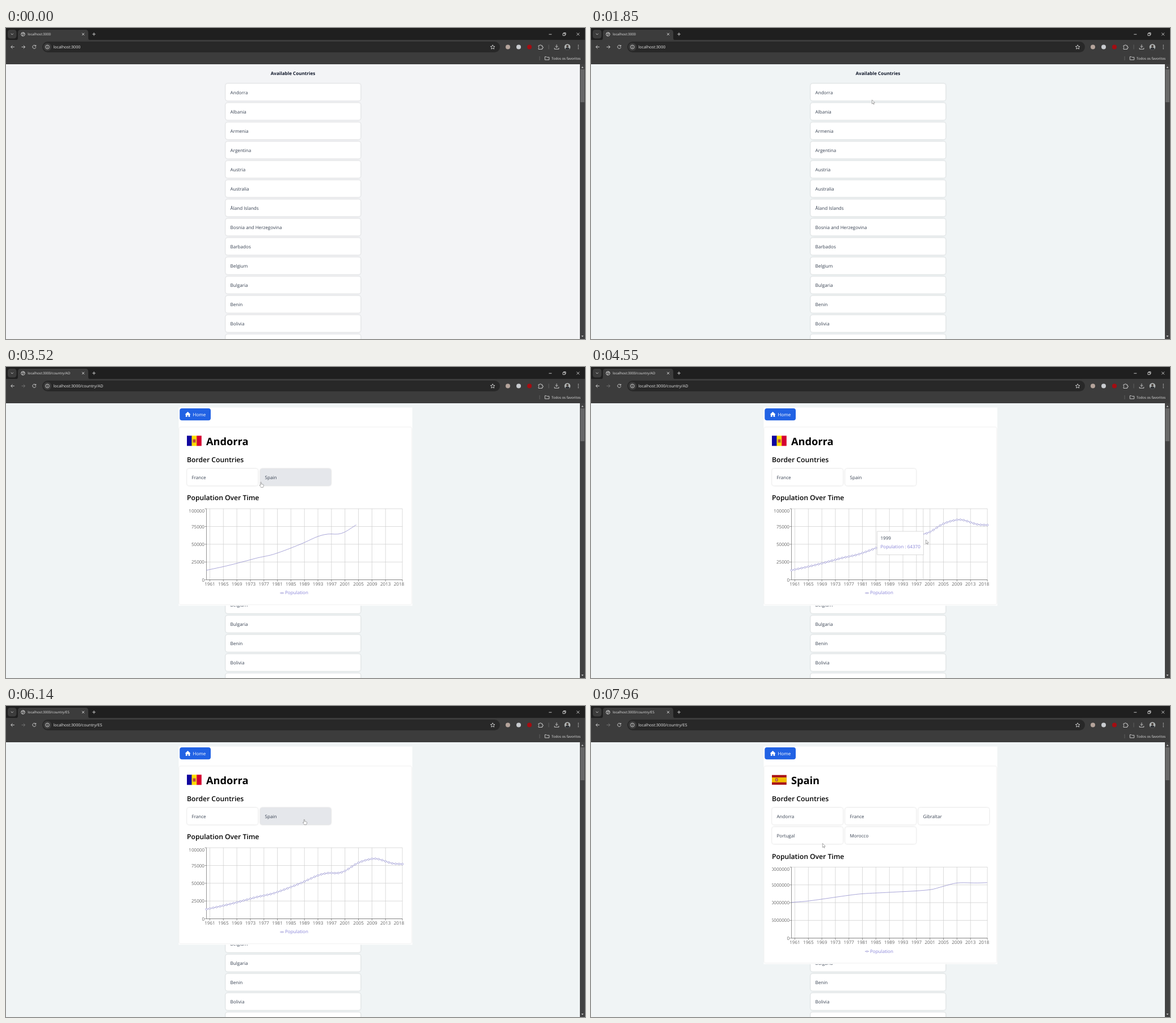
Animation, 1021 px wide and 549 px high, one loop 8 s. Source, as an HTML page:

```html
<!DOCTYPE html>
<html lang="en">
<head>
<meta charset="utf-8">
<title>Countries</title>
<style>
html, body { margin: 0; width: 100%; height: 100%; overflow: hidden; }
svg { display: block; width: 1021px; height: 549px; }
text { font-family: 'Open Sans', 'Noto Sans', sans-serif; font-size: 8.08px; fill: #374151; text-rendering: geometricPrecision; white-space: pre; }
.item { fill: #fff; filter: drop-shadow(0 .6px .8px #0003); }
.item.hover { fill: #e5e7eb; }
.head { font-weight: 700; fill: #0f172a; }
.name { font-size: 18.2px; font-weight: 700; fill: #000; }
.sub { font-size: 12.15px; font-weight: 600; fill: #000; }
.tick { fill: #666; }
.pop { fill: #8884d8; }
.small { font-size: 6.05px; fill: #e3e3e3; }
.url { font-size: 7.08px; fill: #e8e8e8; }
.icon { fill: none; stroke: #d6d6d6; stroke-width: .9; }
.grid { fill: none; stroke: #ccc; stroke-width: .7; }
.axis { fill: none; stroke: #666; stroke-width: .7; }
.line { fill: none; stroke: #8480c8; stroke-width: .7; }
.dot { fill: #fff; stroke: #8480c8; stroke-width: .6; }
</style>
</head>
<body>
<svg id="stage" viewBox="0 0 1021 549"></svg>
<script>
const LOOP = 8000;
const URL_AD = 2400, OPEN_AD = 2790, URL_ES = 6140, OPEN_ES = 6470;
const DRAW_TIME = 1500, DOTS_AT = OPEN_AD + 30 + DRAW_TIME;
const YEARS = 58, PLOT_X = 353.5, PLOT_END = 699, PLOT_H = 125.4, PLOT_TOP = 250.2;
const ROW = 34.2;

const countries = ['Andorra', 'Albania', 'Armenia', 'Argentina', 'Austria', 'Australia', 'Åland Islands',
  'Bosnia and Herzegovina', 'Barbados', 'Belgium', 'Bulgaria', 'Benin', 'Bolivia', ''];

// Key points of population: [years since 1960, thousands or millions]
const andorra = curve([[0, 13.4], [6, 19.6], [12, 26.9], [15, 30.7], [20, 36.1], [28, 50.4], [33, 61],
  [36, 64.36], [39, 64.37], [41, 67.3], [45, 78.9], [49, 84.4], [51, 83.9], [55, 78], [58, 77]]);
const spain = curve([[0, 30.2], [5, 31.4], [17, 36.2], [21, 37.5], [29, 38.7], [41, 40.9], [45, 43.8],
  [49, 46.6], [55, 46.6], [58, 46.9]]);

// Stops of the pointer and of the chart tooltip: [time, x, y]
const pointerStops = [[170, 1003, 400], [660, 624.6, 491], [880, 598, 514], [1370, 598, 514], [1440, 585, 526],
  [1850, 495.5, 126.8], [1910, 495.5, 126.8], [1920, 474, 117], [2260, 474, 117], [3120, 436, 160],
  [3520, 449.5, 203], [4200, 515, 206], [4550, 590.5, 305], [4790, 594, 315], [5400, 594, 300],
  [5740, 596, 219], [5970, 526, 200], [6460, 526, 200], [7350, 440, 172], [7700, 396, 210], [7960, 408.3, 242.5]];
const tooltipStops = [[4550, 504.5, 290], [4950, 597, 318], [5640, 597, 290]];

function along(stops, t) {
  const i = stops.findIndex(s => s[0] > t);
  if (i < 0) return stops.at(-1).slice(1);
  if (i === 0) return stops[0].slice(1);
  const [t0, x0, y0] = stops[i - 1], [t1, x1, y1] = stops[i], u = (t - t0) / (t1 - t0);
  return [x0 + (x1 - x0) * u, y0 + (y1 - y0) * u];
}

// Smooth function through key points (cubic Hermite)
function curve(pts) {
  const slope = i => {
    const a = pts[Math.max(0, i - 1)], b = pts[Math.min(pts.length - 1, i + 1)];
    return (b[1] - a[1]) / (b[0] - a[0]);
  };
  return x => {
    const i = Math.max(1, pts.findIndex(p => p[0] >= x)), [x0, y0] = pts[i - 1], [x1, y1] = pts[i];
    const w = x1 - x0, u = (x - x0) / w, v = 1 - u;
    return y0 * v * v * (1 + 2 * u) + y1 * u * u * (1 + 2 * v) + w * u * v * (slope(i - 1) * v - slope(i) * u);
  };
}

// cubic-bezier(.25, .1, .25, 1)
function ease(x) {
  if (x <= 0) return 0;
  if (x >= 1) return 1;
  let lo = 0, hi = 1, s;
  for (let i = 0; i < 20; i++) {
    s = (lo + hi) / 2;
    if (.75 * s * (1 - s) + s ** 3 < x) lo = s; else hi = s;
  }
  return .3 * s * (1 - s) ** 2 + 3 * s * s * (1 - s) + s ** 3;
}

const text = (x, y, s, cls = '', more = '') => `<text x="${x}" y="${y}" class="${cls}" ${more}>${s}</text>`;
const rect = (x, y, w, h, fill, rx = 0, more = '') =>
  `<rect x="${x}" y="${y}" width="${w}" height="${h}" rx="${rx}" fill="${fill}" ${more}/>`;
const circle = (x, y, r, fill, more = '') => `<circle cx="${x}" cy="${y}" r="${r}" fill="${fill}" ${more}/>`;
const path = (cls, d, more = '') => `<path class="${cls}" d="${d}" ${more}/>`;
const icon = (d, more) => path('icon', d, more);
const item = (x, y, w, label, layer) =>
  rect(x, y, w, 30, '#fff', 4, `class="item" data-layer="${layer}"`) + text(x + 8.3, y + 18.3, label);

const yearX = n => PLOT_X + n * (PLOT_END - PLOT_X) / YEARS;
const plot = (value, max, top) => Array.from({ length: YEARS + 1 },
  (_, n) => [yearX(n), top + PLOT_H * (1 - value(n) / max)]);

function chart(top, pts, max, id) {
  const bottom = top + PLOT_H, legendY = top + 148.8;
  let s = '';
  for (let i = 0; i <= 4; i++) {
    const y = bottom - i * PLOT_H / 4;
    s += path('grid', `M${PLOT_X} ${y}H${PLOT_END}`) + path('axis', `M350.5 ${y}h3`)
      + text(350, y + (i === 4 ? 6.8 : 3), max / 4 * i, 'tick', 'text-anchor="end" clip-path="url(#chartClip)"');
  }
  for (let i = 0; i <= 14; i++) {
    const n = Math.min(1 + i * 4, YEARS), x = yearX(n);
    if (i < 14) s += path('grid', `M${x} ${top}V${bottom}`);
    if (i === 13) continue;
  }
  const labelled = [...Array.from({ length: 14 }, (_, i) => 1 + i * 4), YEARS];
  s += path('grid', `M${PLOT_END} ${top}V${bottom}`);
  for (const n of labelled.filter(n => n < 57 || n === YEARS))
    s += path('axis', `M${yearX(n)} ${bottom}v3`)
      + text(Math.min(yearX(n), 693), bottom + 10.2, 1960 + n, 'tick', 'text-anchor="middle"');
  return s + path('axis', `M${PLOT_X} ${top}V${bottom}H${PLOT_END}`)
    + path('line', 'M' + pts.join('L'), `id="line${id}" pathLength="1"`)
    + path('line', `M483 ${legendY}h7.4`) + circle(486.7, legendY, 1.3, '#fff', 'class="dot"')
    + text(492, legendY + 2.4, 'Population', 'pop');
}

function card(id, name, flag, borders, pts, max) {
  const shift = borders.length > 3 ? ROW : 0;
  return `<g id="card${id}">${rect(304.5, 71.5, 412, 350 + shift, '#fff')}
    ${rect(305.5, 106.5, 409.5, 312.5 + shift, '#fff', 3, 'style="filter:drop-shadow(0 .6px .8px #0002)"')}
    ${rect(306.3, 73, 54.7, 21.3, '#2162e4', 4)}
    <path d="M315.6 83.8l5-4.8 5 4.8h-1.3v4.2h-2.7v-3h-2v3h-2.7v-4.2z" fill="#fff"/>${text(329.5, 86.8, 'Home', '', 'style="fill:#fff"')}
    ${flag}${text(353, 138, name, 'name')}${text(319, 167.5, 'Border Countries', 'sub')}
    ${borders.map((b, i) => item(319.2 + i % 3 * 129, 179.4 + (i / 3 | 0) * ROW, 125, b, id)).join('')}
    ${text(319, 235.4 + shift, 'Population Over Time', 'sub')}
    ${chart(PLOT_TOP + shift, pts, max, id)}</g>`;
}

const flagAD = rect(319, 121.3, 9, 18, '#10069f') + rect(327.5, 121.3, 9, 18, '#fedd00') + rect(336.2, 121.3, 8.6, 18, '#d50032')
  + rect(329, 127, 6, 7, '#c98a3c', 1.5) + rect(330.3, 128.4, 3.4, 4.2, '#c7372f', 1);
const flagES = rect(319, 121.8, 25.8, 17.2, '#aa151b') + rect(319, 126.1, 25.8, 8.6, '#f1bf00')
  + rect(325, 127.6, 4.6, 5.4, '#b0562a', 1) + rect(326.4, 128.8, 1.8, 3, '#d9a08a');

const pointsAD = plot(andorra, 100, PLOT_TOP);
const pointsES = plot(spain, 60, PLOT_TOP + ROW);

const tabStrip = rect(0, 0, 1021, 21.5, '#1f1f1f') + rect(0, 21, 1021, 43, '#3c3c3c')
  + rect(3, 3, 15.5, 15.5, '#3c3c3c', 4.5) + icon('M8.8 9.8l2 2 2-2')
  + '<path d="M17 21.5q4 0 4-4V8q0-5 5-5h114q5 0 5 5v9.5q0 4 4 4z" fill="#3c3c3c"/>'
  + circle(30, 11, 3.3, 'none', 'class="icon"') + icon('M27.3 9.4l2.2.6 1 1.6-1.5 1.1v1.5M30.8 8v1.7l2 .8')
  + text(38.3, 13.3, '', 'small', 'id="tabTitle"')
  + icon('M134 8.8l4.2 4.2m0-4.2l-4.2 4.2M152.3 10.9h5.6m-2.8-2.8v5.6')
  + icon('M957.3 11.2h5M982 9.6h3.8v3.8h-3.8zM983.3 9.4v-1h3.7v3.7h-1M1006.3 8.5l4.8 4.8m0-4.8l-4.8 4.8');

const toolbar = icon('M14.8 33.5H8.8m2.8-2.9l-2.9 2.9 2.9 2.9')
  + icon('M27.5 33.5h6m-2.8-2.9l2.9 2.9-2.9 2.9', 'id="forward"')
  + icon('M52.3 31.6a3 3 0 1 0 .5 2.3M52.7 30v2.2h-2.2')
  + rect(64, 24, 807, 19, '#282828', 9.5) + circle(73, 33.5, 7, '#3c3c3c') + circle(73, 33.5, 3.3, 'none', 'class="icon"')
  + icon('M73 33v2.2M73 31.4v.8') + text(83.5, 36.2, '', 'url', 'id="url"')
  + icon('M858.2 29.8l1.1 2.5 2.7.3-2 1.8.6 2.7-2.4-1.4-2.4 1.4.6-2.7-2-1.8 2.7-.3z')
  + circle(885, 33.5, 4, '#b5a49b') + circle(904, 33.5, 4, '#c9ccd0') + circle(923, 33.5, 4, '#a30d12')
  + icon('M939 31h2.2a1.2 1.2 0 1 1 2.4 0h2v2.3a1.2 1.2 0 1 1 0 2.2v2H939v-2.2a1.2 1.2 0 0 0 0-2.2z')
  + icon('M957 29.5v8M941 50v7', 'style="stroke:#666"')
  + icon('M971 29.3v5m-2.3-2.2l2.3 2.3 2.3-2.3M967.2 35v2.3h7.6V35')
  + circle(990, 33.5, 5.3, '#aeb2b2') + circle(990, 32, 2, '#453b36') + '<path d="M986.3 37.2q.5-3 3.7-3t3.7 3q-3.7 3-7.4 0z" fill="#2c2f33"/>'
  + [-3, 0, 3].map(dy => circle(1009.3, 33.5 + dy, .8, '#d6d6d6')).join('')
  + icon('M950.3 50.7h2.6l1 1h3.9v4.4h-7.5z') + text(962, 55.5, 'Todos os favoritos', 'small');

const scrollbar = rect(1012, 64, 9, 485, '#424242') + rect(1013, 73, 7, 58, '#686868')
  + '<path d="M1014.5 70.5l2-2.5 2 2.5zM1014.5 543l2 2.5 2-2.5z" fill="#c8c8c8"/>';

const tooltip = `<g id="active">${path('grid', '', 'id="guide"')}
  <circle id="activeDot" r="1.7" fill="#8884d8" stroke="#fff" stroke-width=".6"/>
  <g id="tooltip">${rect(0, 0, 81.5, 41.3, '#fff', 0, 'class="grid" style="fill:#fff"')}
  ${text(5.7, 15.3, '', '', 'id="tipYear"')}${text(5.7, 30.3, '', 'pop', 'id="tipValue"')}</g></g>`;

const pointer = `<g id="pointer" fill="#fff" stroke="#555" stroke-width=".5" stroke-linejoin="round">
  <path id="arrow" d="M0 0v7.2l1.7-1.6 1.1 2.5 1-.4-1.1-2.5h2.3z"/>
  <path id="hand" d="M-.8.7q.8-1.2 1.5 0v3l3 .6q1 .3 1 1.3-.2 2.4-1 3.9h-3.7q-1.2-2-2.6-3.6.3-1.3 1.8-.2z"/></g>`;

stage.innerHTML = `<clipPath id="chartClip"><rect x="319" y="240" width="383" height="220"/></clipPath>
  <rect id="page" y="64" width="1021" height="485"/>
  ${text(506, 82.6, 'Available Countries', 'head', 'text-anchor="middle"')}
  ${countries.map((c, i) => item(387.3, 98.3 + i * 34.04, 238, c, 'list')).join('')}
  ${card('AD', 'Andorra', flagAD, ['France', 'Spain'], pointsAD, 100000)}
  <g id="dots">${pointsAD.map(([x, y]) => circle(x, y, 1.6, '#fff', 'class="dot"')).join('')}</g>
  ${tooltip}
  ${card('ES', 'Spain', flagES, ['Andorra', 'France', 'Gibraltar', 'Portugal', 'Morocco'], pointsES, 60000000)}
  ${tabStrip}${toolbar}${scrollbar}${pointer}`;

const $ = id => document.getElementById(id);
const show = (id, on) => $(id).style.display = on ? '' : 'none';
const items = [...document.querySelectorAll('.item')].map(el => ({
  el, layer: el.dataset.layer, x: +el.getAttribute('x'), y: +el.getAttribute('y'), w: +el.getAttribute('width')
}));

function drawTooltip(t, x, y) {
  const on = t >= DOTS_AT && t < OPEN_ES && y > PLOT_TOP;
  show('active', on);
  if (!on) return;
  const n = Math.floor((x - PLOT_X) / (yearX(1) - PLOT_X)), [px, py] = pointsAD[n];
  $('guide').setAttribute('d', `M${px} ${PLOT_TOP}v${PLOT_H}`);
  $('activeDot').setAttribute('cx', px);
  $('activeDot').setAttribute('cy', py);
  $('tooltip').setAttribute('transform', `translate(${along(tooltipStops, t)})`);
  $('tipYear').textContent = 1960 + n;
  $('tipValue').textContent = 'Population : ' + Math.round(andorra(n) * 1000);
}

function draw(t) {
  const layer = t < OPEN_AD ? 'list' : t < OPEN_ES ? 'AD' : 'ES';
  const route = t < URL_AD ? '' : t < URL_ES ? '/country/AD' : '/country/ES';
  $('tabTitle').textContent = $('url').textContent = 'localhost:3000' + route;
  $('forward').style.stroke = route ? '#777' : '#d6d6d6';
  $('page').setAttribute('fill', t < 170 ? '#f3f4f6' : '#f0f4f5');
  for (const [id, opened] of [['AD', OPEN_AD + 30], ['ES', OPEN_ES + 60]]) {
    show('card' + id, layer === id);
    $('line' + id).setAttribute('stroke-dasharray', ease((t - opened) / DRAW_TIME) + ' 2');
  }
  show('dots', layer === 'AD' && t >= DOTS_AT);

  const [x, y] = along(pointerStops, t), visible = t >= pointerStops[0][0];
  let over = false;
  for (const it of items) {
    const hit = visible && it.layer === layer && x >= it.x && x <= it.x + it.w && y >= it.y && y < it.y + 28;
    it.el.classList.toggle('hover', hit);
    over ||= hit;
  }
  show('pointer', visible);
  show('hand', over);
  show('arrow', !over);
  $('pointer').setAttribute('transform', `translate(${x} ${y})`);
  drawTooltip(t, x, y);
}

function frame() {
  draw(performance.now() % LOOP);
  requestAnimationFrame(frame);
}
frame();
</script>
</body>
</html>
```
